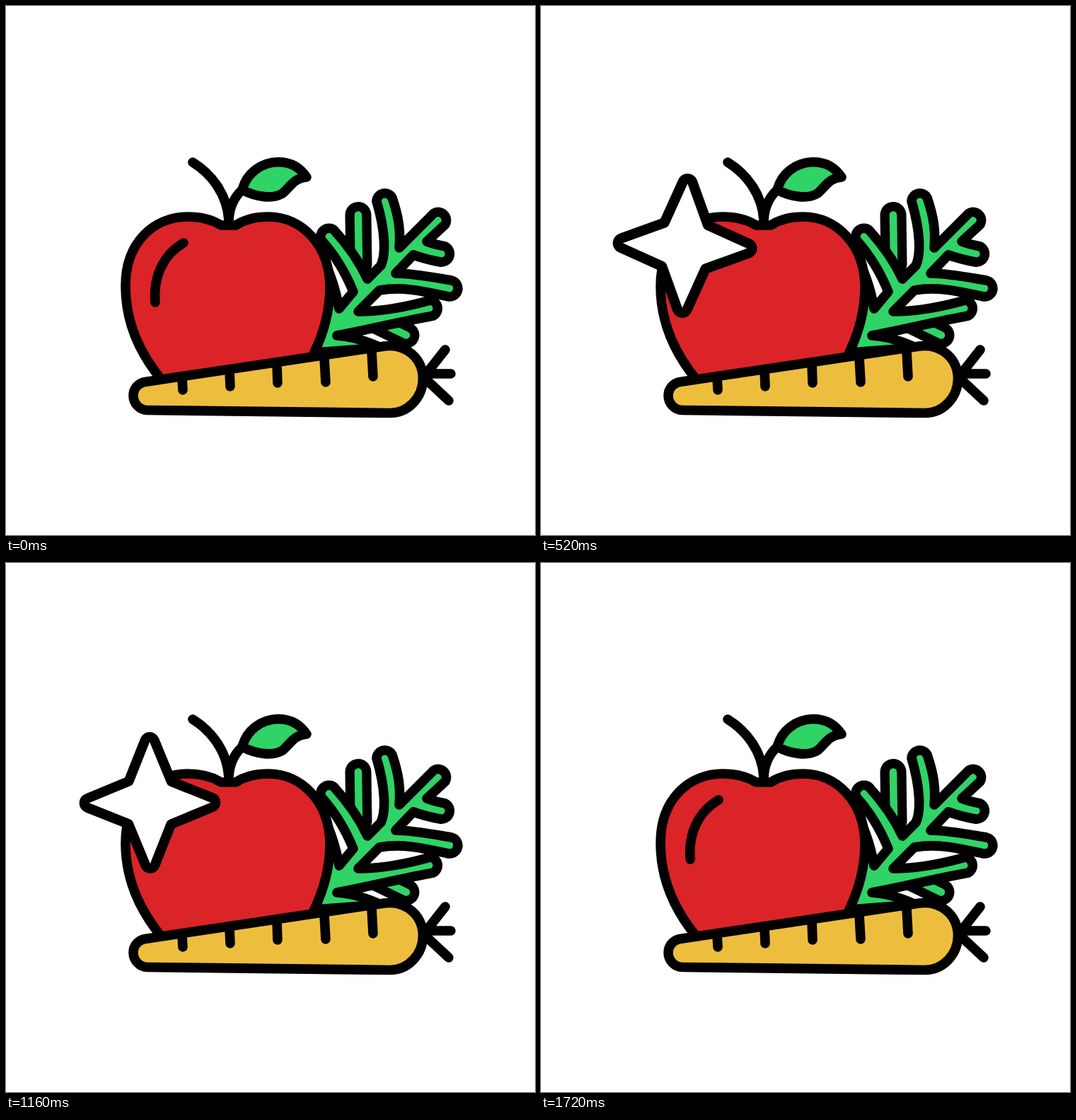
Write an HTML page that moves like this. It is 748x748 px and loops after 6000 ms.

```html
<!DOCTYPE html>
<html lang="en">
<head>
<meta charset="utf-8">
<title>Apple and carrot</title>
<style>
html, body { margin: 0; width: 100%; height: 100%; overflow: hidden; background: #fff; }
svg { display: block; width: 100vw; height: 100vh; }
.line { fill: none; stroke: #000; stroke-width: 13.6; stroke-linecap: round; stroke-linejoin: round; }
.leaf { fill: #30d366; }
.apple { fill: #db2428; }
.carrot { fill: #edbe3e; }
.star { fill: #fff; stroke-width: 14; }
.twig { fill: none; stroke: #000; stroke-width: 37; stroke-linecap: round; }
.twig.core { stroke: #30d366; stroke-width: 10.5; }
</style>
</head>
<body>
<svg viewBox="0 0 748 748">
  <defs>
    <path id="twigs" d="M498 295.500L499 365M566 465.500L526 446"/>
  </defs>

  <!-- carrot greens -->
  <use href="#twigs" class="twig"/>
  <use href="#twigs" class="twig core"/>
  <path class="line leaf" d="M438 490L440 340Q464 385 471 428L491 404Q474 362 446 331
    A11.700 11.700 0 0 1 464 317C483 338 500 362 511 386
    L530 367C537 352 537 320 524 276A11.700 11.700 0 0 1 546 271
    C556 300 558 320 556 342L605 293A11.700 11.700 0 0 1 621 309
    L595 333C602 336 611 338 621 340A11.700 11.700 0 0 1 614 362
    C598 359 587 356 576 352L551 378C575 378 600 383 630 388
    A11.700 11.700 0 0 1 626 411C592 404 562 396 528 402
    L498 432C535 432 568 425 600 416A11.700 11.700 0 0 1 604 438
    C560 446 520 456 468 466C490 467 510 474 530 483Z"/>

  <!-- apple -->
  <path class="line apple" d="M218 526C188 489 169 445 169 396C169 333 210 298 257 298
    C277 298 293 303 304 310H325C337 302 352 298 371 298C418 298 458 338 458 398
    C458 432 448 465 435 492"/>
  <path class="line leaf" d="M334 260C340 237 360 221 385 220.500C405 221 416 229 425 242
    C407 243 401 257 391 265C378 273 355 271 334 260Z"/>
  <path class="line" d="M264 221C290 237 313 266 315 303C316 283 323 270 334 260M251 335C222 352 208 383 211 419"/>

  <!-- carrot -->
  <path class="line carrot" d="M197 531.500L535 481C565 477 589.500 498 589.500 527
    C589.500 553 569 575.500 543 575.500L200 571.500C189 571.500 180 562 180 551
    C180 541 187 533 197 531.500Z"/>
  <path class="line" d="M249 526L250 543M316 515L317 538M383 505L384 533M450 497L452 532M517 487L519 524
    M595 519L621 486M593 520H629M596 530L626 558"/>

  <path id="star" class="line star"/>
</svg>
<script>
const LOOP = 6000, STEP = 40, START = 120, END = 1720;
const star = document.getElementById('star');

// Four rounded points with a notch between each pair.
function starPath() {
  let d = '';
  for (let i = 0; i < 4; i++) {
    const a = i * Math.PI / 2, c = Math.cos(a), s = Math.sin(a);
    const at = (x, y) => (x * c - y * s).toFixed(2) + ' ' + (x * s + y * c).toFixed(2);
    d += (i ? 'L' : 'M') + at(-6.5, -88.5) + 'A7 7 0 0 1 ' + at(6.5, -88.5) + 'L' + at(30.5, -29.8);
  }
  return d + 'Z';
}

// [time, scale, slope per ms]
const scaleKeys = [
  [140, 0, .0030], [400, .755, .0030], [530, 1.025, 0], [710, 1, 0], [1340, 1, 0],
  [1395, 1.01, 0], [1440, .99, -.0020], [1560, .504, -.0036], [1712, 0, -.0030]
];

function scaleAt(t) {
  const i = scaleKeys.findIndex(k => k[0] > t);
  if (i < 1) return 0;
  const [t0, v0, m0] = scaleKeys[i - 1], [t1, v1, m1] = scaleKeys[i];
  const w = t1 - t0, u = (t - t0) / w, r = 1 - u;
  return r * r * ((1 + 2 * u) * v0 + u * w * m0) + u * u * ((3 - 2 * u) * v1 - r * w * m1);
}

// Spins in from one side, rests upright, then spins out to the other.
function angleAt(t) {
  const spin = dt => Math.max(0, 95 * 2 ** (-dt / 80) - .5);
  return spin(t - START) - spin(END - t);
}

function draw(time) {
  const t = Math.floor((time % LOOP) / STEP) * STEP;
  const size = scaleAt(t);
  star.style.display = size > 0 ? '' : 'none';
  if (size > 0) {
    star.setAttribute('transform', `translate(203.5 339) rotate(${angleAt(t)}) scale(${size})`);
  }
}

star.setAttribute('d', starPath());
const begin = performance.now();
function tick() {
  draw(performance.now() - begin);
  requestAnimationFrame(tick);
}
tick();
</script>
</body>
</html>
```
